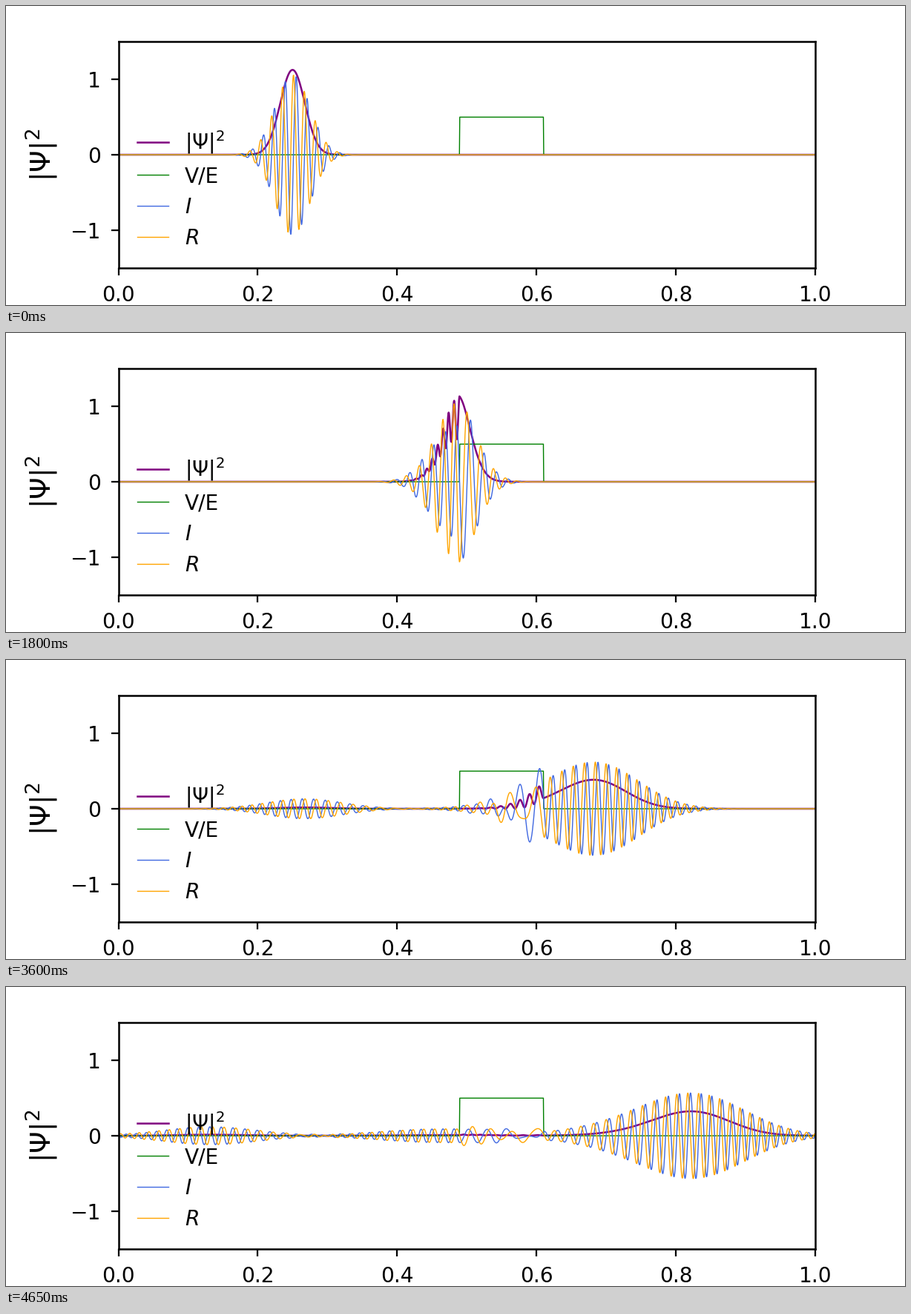
A matplotlib script that plays this animation: 1212 by 404 pixels, repeating every 4.8 s.

```python
import numpy as np
import matplotlib.pyplot as plt
from matplotlib.animation import FuncAnimation

FRAMES, INTERVAL = 32, 150
STEPS = 250              # solver steps per frame
DX, DT = 0.0005, 1e-7
K, X0, SIGMA = 400, 0.25, 0.025
BARRIER = 0.5            # barrier height relative to the packet energy
SHOWN = 2001             # grid points inside the visible range

x = np.arange(2401) * DX
barrier = np.where((x > 0.49 - DX / 2) & (x < 0.61 + DX / 2), BARRIER, 0.0)
potential = barrier * K**2


def hamiltonian(u):
    out = np.zeros_like(u)
    out[1:-1] = (2 * u[1:-1] - u[2:] - u[:-2]) / DX**2 + potential[1:-1] * u[1:-1]
    return out


def simulate():
    """Leapfrog the wave packet, keeping one (real, imaginary) pair per frame."""
    height = np.sqrt(0.05 / (SIGMA * np.sqrt(np.pi)))
    envelope = height * np.exp(-((x - X0) ** 2) / (2 * SIGMA**2))
    re, im = envelope * np.cos(K * x), envelope * np.sin(K * x)
    states = [(re.copy(), im.copy())]
    for _ in range(FRAMES - 1):
        for _ in range(STEPS):
            re += DT / 2 * hamiltonian(im)
            im -= DT * hamiltonian(re)
            re += DT / 2 * hamiltonian(im)
        states.append((re.copy(), im.copy()))
    return states


states = simulate()

fig = plt.figure(figsize=(6, 2), dpi=202, facecolor="white")
ax = fig.add_axes([0.125, 0.125, 0.775, 0.755])
ax.set(xlim=(0, 1), ylim=(-1.5, 1.5), yticks=[-1, 0, 1])
ax.tick_params(pad=5, labelsize=10)
for spine in ax.spines.values():
    spine.set_linewidth(0.9)
fig.text(73 / 1212, 1 - 201 / 404, r"$|\Psi|^2$", fontsize=13.5,
         rotation=90, ha="right", va="center")


def add_line(color, width, label, y=()):
    xs = x[:SHOWN] if len(y) else []
    return ax.plot(xs, y, color=color, lw=width, label=label)[0]


density = add_line("purple", 0.9, r"$|\Psi|^2$")
add_line("green", 0.5, "V/E", barrier[:SHOWN])
imag = add_line("royalblue", 0.5, "$I$")
real = add_line("orange", 0.5, "$R$")
ax.legend(loc="lower left", frameon=False, handlelength=1.5, fontsize=10)


def update(i):
    re, im = (part[:SHOWN] for part in states[i])
    density.set_data(x[:SHOWN], re**2 + im**2)
    imag.set_data(x[:SHOWN], im)
    real.set_data(x[:SHOWN], re)
    return density, imag, real


anim = FuncAnimation(fig, update, frames=FRAMES, interval=INTERVAL,
                     repeat=True, repeat_delay=0)
plt.show()
```
